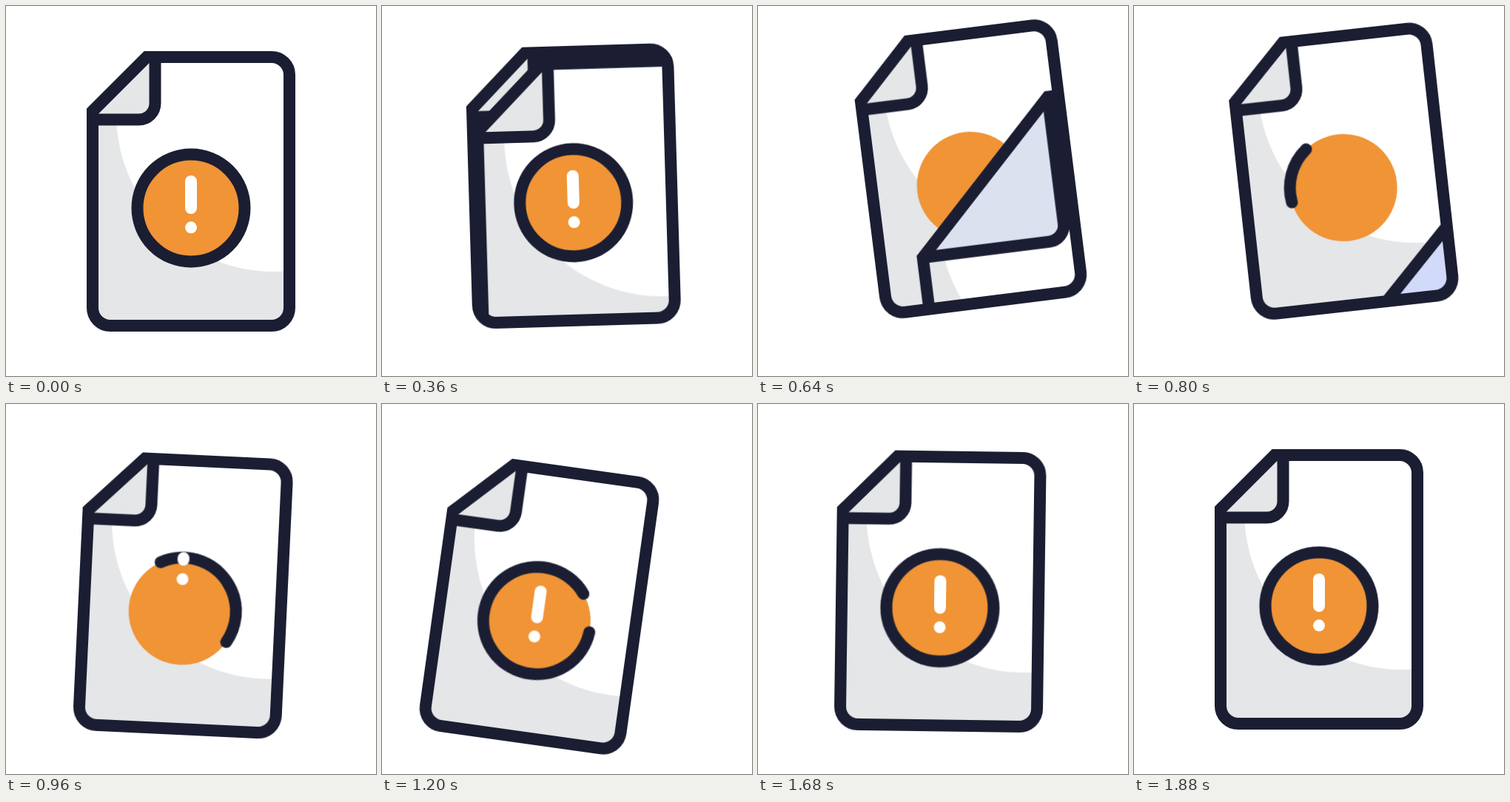
Write an HTML page without scripts that moves like this. It is 500 px wide and 500 px high and loops after 2000 ms.

```html
<!DOCTYPE html>
<html lang="en">
<head>
<meta charset="utf-8">
<title>Document alert</title>
<style>
  html, body { margin: 0; width: 100%; height: 100%; overflow: hidden; background: #fff; }
  svg { display: block; width: 100vw; height: 100vh; }

  :root {
    --navy: #1b1e32;
    --orange: #f09436;
    --grey: #e4e6e7;
    --lavender: #d2dafa;
  }

  .line { fill: none; stroke: var(--navy); stroke-width: 16; }
  .paper { fill: var(--grey); }
  .light { fill: #fff; }
  .disc { fill: var(--orange); }
  .fold { fill: var(--grey); stroke: var(--navy); stroke-width: 16; }
  .mark { fill: #fff; }
  .stem { fill: none; stroke: #fff; stroke-width: 16; stroke-linecap: round; }

  .sway, .ring, .drop, .drop .stem, .edge, .peel-fold, .peel-light {
    animation: 2s linear infinite;
  }

  /* whole document swings right, left and back */
  .sway { transform-origin: 250px 273px; animation-name: sway; }
  @keyframes sway {
    0%, 11.5% { transform: translate(0, 0) rotate(0deg); animation-timing-function: cubic-bezier(.4, 0, .3, 1); }
    36% { transform: translate(38px, -31.2px) rotate(-7.3deg); animation-timing-function: cubic-bezier(.52, 0, .66, .54); }
    48% { transform: translate(-11.5px, 7px) rotate(2.65deg); animation-timing-function: cubic-bezier(.19, .54, .47, 1); }
    63% { transform: translate(-41.3px, 20px) rotate(8.1deg); animation-timing-function: cubic-bezier(.52, 0, .66, .54); }
    76% { transform: translate(-18.5px, 11px) rotate(3.6deg); animation-timing-function: cubic-bezier(.19, .54, .47, 1); }
    94%, 100% { transform: translate(0, 0) rotate(0deg); }
  }

  /* top sheet peels off towards the lower right */
  .edge { animation-name: edge; }
  @keyframes edge {
    0%, 11% { d: path("M117 700V142L190 69H700V700Z"); animation-timing-function: cubic-bezier(.4, 0, .75, .65); }
    26% { d: path("M140 700V259L272 127H700V700Z"); animation-timing-function: cubic-bezier(.3, .2, .7, .8); }
    40% { d: path("M220 700V502L500 222H700V700Z"); }
    44.5%, 100% { d: path("M250 700V590L590 250H700V700Z"); }
  }
  .peel-fold { animation-name: peel-fold; }
  @keyframes peel-fold {
    0%, 11% { d: path("M201.5 69V131.5a22 22 0 0 1 -22 22H117"); animation-timing-function: cubic-bezier(.4, 0, .75, .65); }
    26% { d: path("M272 127V237a22 22 0 0 1 -22 22H140"); fill: var(--grey); animation-timing-function: cubic-bezier(.3, .2, .7, .8); }
    40% { d: path("M500 222V480a22 22 0 0 1 -22 22H220"); fill: var(--lavender); }
    44.5%, 100% { d: path("M590 250V568a22 22 0 0 1 -22 22H250"); fill: var(--lavender); }
  }
  .peel-light { animation-name: peel-light; }
  @keyframes peel-light {
    0%, 11% { transform: translate(0, 0); animation-timing-function: cubic-bezier(.4, 0, .75, .65); }
    26% { transform: translate(38px, 164px); }
    40%, 100% { transform: translate(70px, 230px); }
  }

  /* ring draws itself while turning */
  .ring { stroke-linecap: round; transform-origin: 250px 273px; animation-name: ring; }
  @keyframes ring {
    0%, 34.4% { opacity: 0; stroke-dasharray: 3 357; transform: rotate(122deg); }
    34.5% { opacity: 1; stroke-dasharray: 3 357; transform: rotate(122deg); }
    40% { stroke-dasharray: 61 299; transform: rotate(170deg); }
    48% { stroke-dasharray: 148 212; transform: rotate(243deg); }
    60% { stroke-dasharray: 317 43; transform: rotate(364deg); animation-timing-function: ease-out; }
    66%, 100% { opacity: 1; stroke-dasharray: 360 0; transform: rotate(405deg); }
  }

  /* exclamation mark drops in from above */
  .drop { animation-name: drop; }
  @keyframes drop {
    0%, 39% { transform: translate(0, -120px); }
    48% { transform: translate(-1.7px, -70px); }
    60% { transform: translate(-.5px, -4.6px); animation-timing-function: ease-out; }
    66%, 100% { transform: translate(0, 0); }
  }
  .drop .stem { animation-name: grow; }
  @keyframes grow {
    0%, 39% { stroke-dasharray: .1 40; }
    48% { stroke-dasharray: 2 40; }
    60% { stroke-dasharray: 35 40; }
    66%, 100% { stroke-dasharray: 36 40; }
  }
</style>
</head>
<body>
<svg viewBox="0 0 500 500">
  <defs>
    <path id="page" d="M117 142L190 69H359a24 24 0 0 1 24 24V408a24 24 0 0 1 -24 24H141a24 24 0 0 1 -24 -24Z"/>
    <clipPath id="in-page"><use href="#page"/></clipPath>
    <clipPath id="in-sheet"><path class="edge" d="M117 700V142L190 69H700V700Z"/></clipPath>
  </defs>

  <g class="sway">
    <g clip-path="url(#in-page)">
      <!-- fresh page -->
      <rect class="paper" width="500" height="500"/>
      <circle class="light" cx="362" cy="146" r="213"/>
      <path class="fold" d="M201.5 69V131.5a22 22 0 0 1 -22 22H117"/>
      <circle class="disc" cx="250" cy="273" r="72.5"/>
      <circle class="line ring" cx="250" cy="273" r="72.5" pathLength="360"/>
      <g class="drop">
        <path class="stem" d="M250 273V237" pathLength="36"/>
        <circle class="mark" cx="250" cy="299.3" r="8"/>
      </g>

      <!-- peeling sheet -->
      <g clip-path="url(#in-sheet)">
        <rect class="paper" width="500" height="500"/>
        <circle class="light peel-light" cx="362" cy="146" r="213"/>
        <circle class="disc" cx="250" cy="273" r="72.5"/>
        <circle class="line" cx="250" cy="273" r="72.5"/>
        <path class="stem" d="M250 273V237"/>
        <circle class="mark" cx="250" cy="299.3" r="8"/>
        <path class="fold peel-fold" d="M201.5 69V131.5a22 22 0 0 1 -22 22H117"/>
      </g>
      <path class="line edge" d="M117 700V142L190 69H700V700Z"/>
    </g>
    <use class="line" href="#page"/>
  </g>
</svg>
</body>
</html>
```
